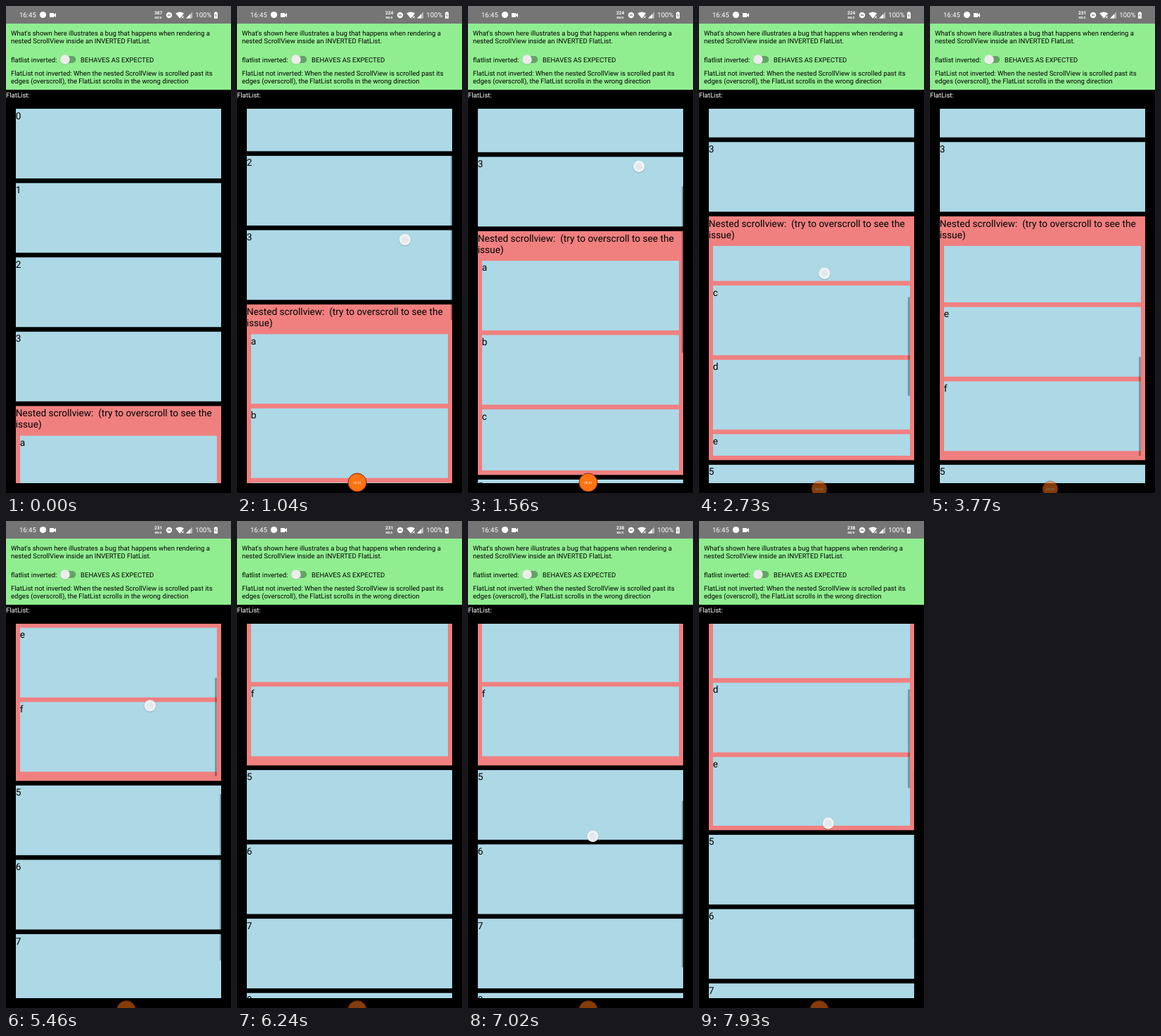
These frames come from a looping animation (320x692 px, 8000 ms). An HTML page:

```html
<!DOCTYPE html>
<html lang="en">
<head>
<meta charset="utf-8">
<title>Nested scroll demo</title>
<style>
  html, body { margin: 0; height: 100%; overflow: hidden; background: #000; }
  #stage { display: block; width: 100vw; height: 100vh; }
  text { font-family: Roboto, Arial, sans-serif; font-size: 9.57px; text-rendering: geometricPrecision; }
  .big text { font-size: 13.67px; }
  .status, .status text { fill: #fff; }
  .status .small { font-size: 6.5px; font-weight: 700; }
  .status .tiny { font-size: 4.3px; font-weight: 700; }
  #clock { font-size: 4.6px; fill: #fff; text-anchor: middle; }
</style>
</head>
<body>
<svg id="stage" viewBox="0 0 320 692">
  <rect width="320" height="692"/>
  <rect width="320" height="25" fill="#757575"/>
  <g class="status">
    <text x="19" y="16">16:45</text>
    <circle cx="52.5" cy="12.5" r="4.6"/>
    <path d="M62 10h6v2l3-2v6l-3-2v2h-6z"/>
    <text class="small" id="speed" x="211" y="12.2"></text>
    <text class="tiny" x="211.6" y="17.6">KB/S</text>
    <circle cx="232" cy="13" r="4.2"/>
    <path d="M229.8 13h4.4" stroke="#757575" stroke-width="1.3"/>
    <path d="M241.3 10.5q5.9-4 11.8 0l-5.9 7.3z"/>
    <path d="M249.5 14l3.5 3.5m0-3.5l-3.5 3.5" stroke="#fff"/>
    <path d="M256 17.5l9-9v9z" fill="#bbb"/>
    <path d="M256 17.5l6-6v6z"/>
    <text x="269.3" y="16">100%</text>
    <path d="M296 9.2h1.3v-1h2.4v1h1.3v8.5h-5z"/>
    <path d="M299 10.5l-1.6 3h2l-1.3 2.6" fill="none" stroke="#757575" stroke-width=".7"/>
  </g>

  <rect y="25" width="320" height="94" fill="lightgreen"/>
  <text x="7" y="41.6">What's shown here illustrates a bug that happens when rendering a</text>
  <text x="7" y="52.8">nested ScrollView inside an INVERTED FlatList.</text>
  <text x="7" y="79.6">flatlist inverted:</text>
  <rect x="78" y="71" width="21.3" height="10" rx="5" fill="#62a465"/>
  <circle cx="84" cy="76.5" r="6.9" fill="#000" opacity=".15"/>
  <circle cx="84" cy="76" r="6.8" fill="#ececec"/>
  <text x="106" y="79.6">BEHAVES AS EXPECTED</text>
  <text x="7" y="99">FlatList not inverted: When the nested ScrollView is scrolled past its</text>
  <text x="7" y="110.2">edges (overscroll), the FlatList scrolls in the wrong direction</text>
  <text x="0" y="129.8" fill="#fff">FlatList:</text>

  <svg class="big" x="14" y="146" width="292" height="532">
    <g id="list">
      <g transform="translate(0 422.4)">
        <rect width="292" height="346.4" fill="lightcoral"/>
        <text x="-.3" y="14.7">Nested scrollview:&nbsp; (try to overscroll to see the</text>
        <text x="-.3" y="30.7">issue)</text>
        <svg y="42" width="286" height="298">
          <g id="inner"></g>
          <rect id="innerBar" x="283" width="3"/>
        </svg>
      </g>
    </g>
    <rect id="listBar" x="290" width="2"/>
  </svg>

  <g id="record">
    <circle id="disc" fill="#ff7410" stroke="#8a2408"/>
    <text id="clock" y="1.7"></text>
  </g>
  <g id="touch">
    <circle cy=".6" r="8.8" opacity=".15"/>
    <circle r="8.2" fill="#f4f6f7" opacity=".94"/>
    <circle r="5" fill="#e4eaec"/>
  </g>
</svg>
<script>
const LOOP = 8000, STEP = 130, PITCH = 105.6;
const $ = id => document.getElementById(id);
const ramp = (t, from, to) => Math.min(1, Math.max(0, (t - from) / (to - from)));
const place = (el, x, y) => el.setAttribute('transform', `translate(${x} ${y})`);

// Height of the visible part and of the whole content
const panes = {
  list: { view: 532, content: 1198 },
  inner: { view: 298, content: 6 * PITCH }
};

// Finger strokes; list and inner give how far each pane under the finger scrolls
const drags = [
  { time: [320, 1665], from: [233, 476], to: [244, 207], list: 269.5 },
  { time: [2070, 3500], from: [172, 535], to: [186, 199], inner: 335.6 },
  { time: [4152, 5564], from: [190.6, 531], to: [206, 241], list: 298, inner: 0 },
  { time: [7020, 7430], from: [177.5, 448], to: [181, 540], list: -92 },
  { time: [7470, 8000], from: [180, 314], to: [184.5, 447], inner: -131 }
];

function addItem(parent, label, x, y, width) {
  parent.insertAdjacentHTML('beforeend',
    `<rect x="${x}" y="${y}" width="${width}" height="99" fill="lightblue"/>
     <text x="${x - .2}" y="${y + 14.5}">${label}</text>`);
}
for (const i of [0, 1, 2, 3, 5, 6, 7, 8]) {
  addItem($('list'), i, 0, i < 4 ? i * PITCH : 775.4 + (i - 5) * PITCH, 292);
}
[...'abcdef'].forEach((c, i) => addItem($('inner'), c, 6, i * PITCH, 280));

function scrollPane(name, t) {
  const { view, content } = panes[name], bar = $(name + 'Bar');
  let offset = 0, alpha = 0;
  for (const drag of drags.filter(d => name in d && t >= d.time[0])) {
    const end = drag.time[1];
    offset += drag[name] * ramp(t, ...drag.time);
    alpha = .3 * (1 - ramp(t, end + 300, end + 550));
  }
  place($(name), 0, -offset);
  bar.setAttribute('y', offset * view / content);
  bar.setAttribute('height', view * view / content);
  bar.setAttribute('opacity', alpha);
}

function drawTouch(t) {
  const drag = drags.find(d => t >= d.time[0] && t <= d.time[1]);
  $('touch').setAttribute('opacity', drag ? 1 : 0);
  if (!drag) return;
  const k = ramp(t, ...drag.time);
  place($('touch'), ...drag.from.map((v, i) => v + (drag.to[i] - v) * k));
}

// The button dims as it sinks, then tucks itself under the edge
function drawRecorder(t) {
  const dim = ramp(t, 2000, 2500), tuck = ramp(t, 4600, 5200);
  place($('record'), 171, 677 + 9 * (dim + tuck));
  $('record').setAttribute('opacity', t < 450 ? 0 : 1 - .48 * dim);
  $('disc').setAttribute('r', 13 - 2 * dim + 2.5 * tuck);
  $('clock').textContent = '00:0' + Math.floor(t / 1000);
}

function draw(t) {
  scrollPane('list', t);
  scrollPane('inner', t);
  drawTouch(t);
  drawRecorder(t);
  $('speed').textContent = [387, 224, 231, 238][Math.floor((t + 2400) / 3000)];
}

function tick() {
  const t = performance.now() % LOOP;
  draw(Math.floor(t / STEP) * STEP);
  requestAnimationFrame(tick);
}
tick();
</script>
</body>
</html>
```
